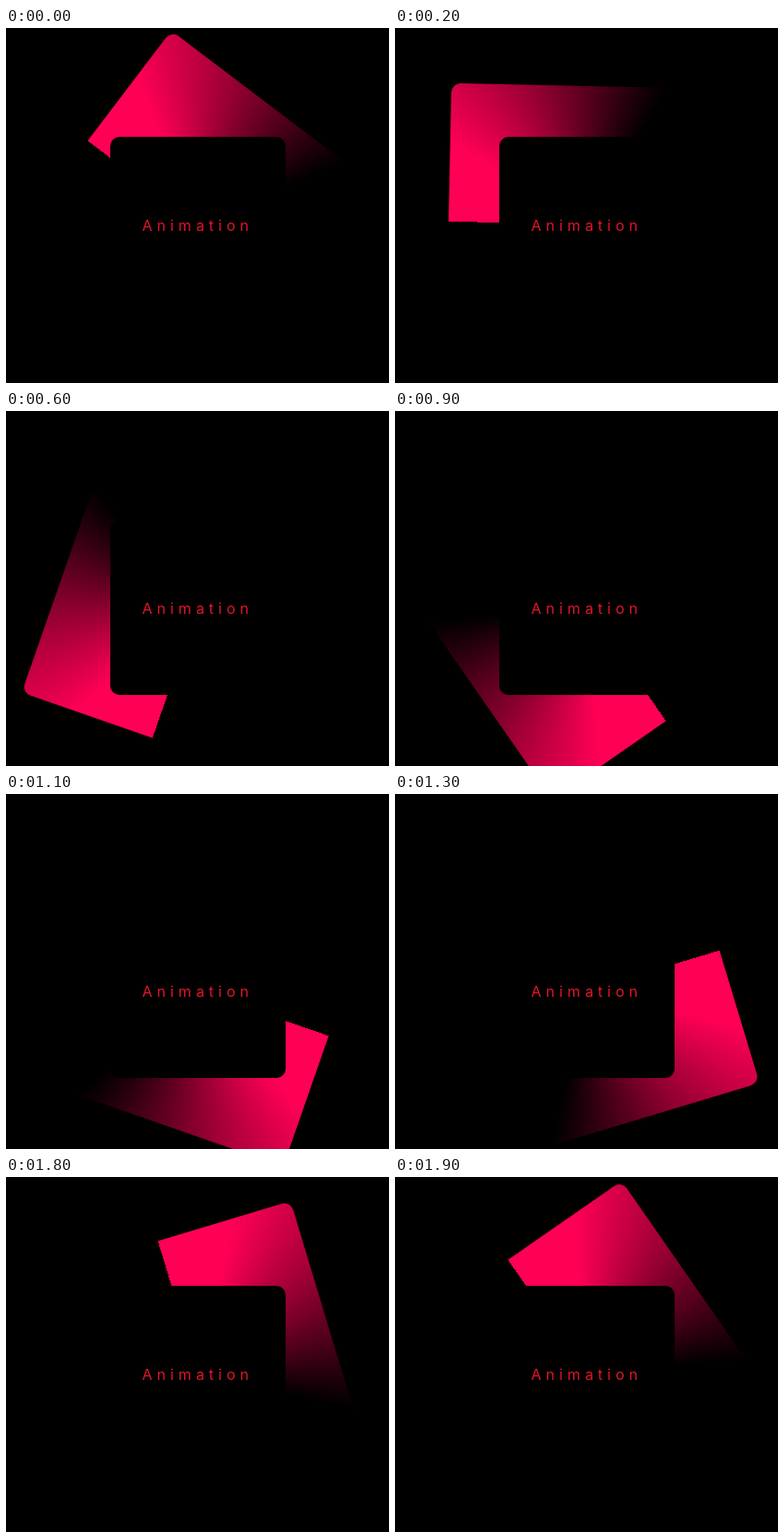
Recreate the animation shown at these times as an HTML page. Size 415x385 px, loop 2 s.

```html
<!DOCTYPE html>
<html lang="en">
<head>
<meta charset="utf-8">
<title>Animation</title>
<style>
  html, body {
    margin: 0;
    width: 100%;
    height: 100%;
    overflow: hidden;
    background: #000;
  }
  .stage {
    position: relative;
    width: 415px;
    height: 385px;
    overflow: hidden;
  }
  .sweep, .card {
    position: absolute;
    border-radius: 10px;
  }
  .sweep {
    left: 58px;
    top: 63px;
    width: 300px;
    height: 300px;
    background: conic-gradient(from -90deg, #ff0055 30deg, #ff005500 120deg);
  }
  .card {
    left: 113px;
    top: 118px;
    width: 190px;
    height: 190px;
    background: #000;
  }
  svg {
    position: absolute;
    inset: 0;
  }
  text {
    font: 16px Inter, sans-serif;
    letter-spacing: 5px;
    fill: #e3152a;
  }
</style>
</head>
<body>
<div class="stage">
  <div class="sweep"></div>
  <div class="card"></div>
  <svg width="415" height="385"><text x="147.5" y="220">Animation</text></svg>
</div>
<script>
  const LOOP = 2000;
  const STEP = 100;
  const START_ANGLE = 37.2;
  const sweep = document.querySelector('.sweep');

  // Counter-clockwise turn, advancing ten times a second.
  function draw() {
    const time = Math.floor(performance.now() % LOOP / STEP) * STEP;
    sweep.style.transform = `rotate(${START_ANGLE - 360 * time / LOOP}deg)`;
    requestAnimationFrame(draw);
  }
  draw();
</script>
</body>
</html>
```
